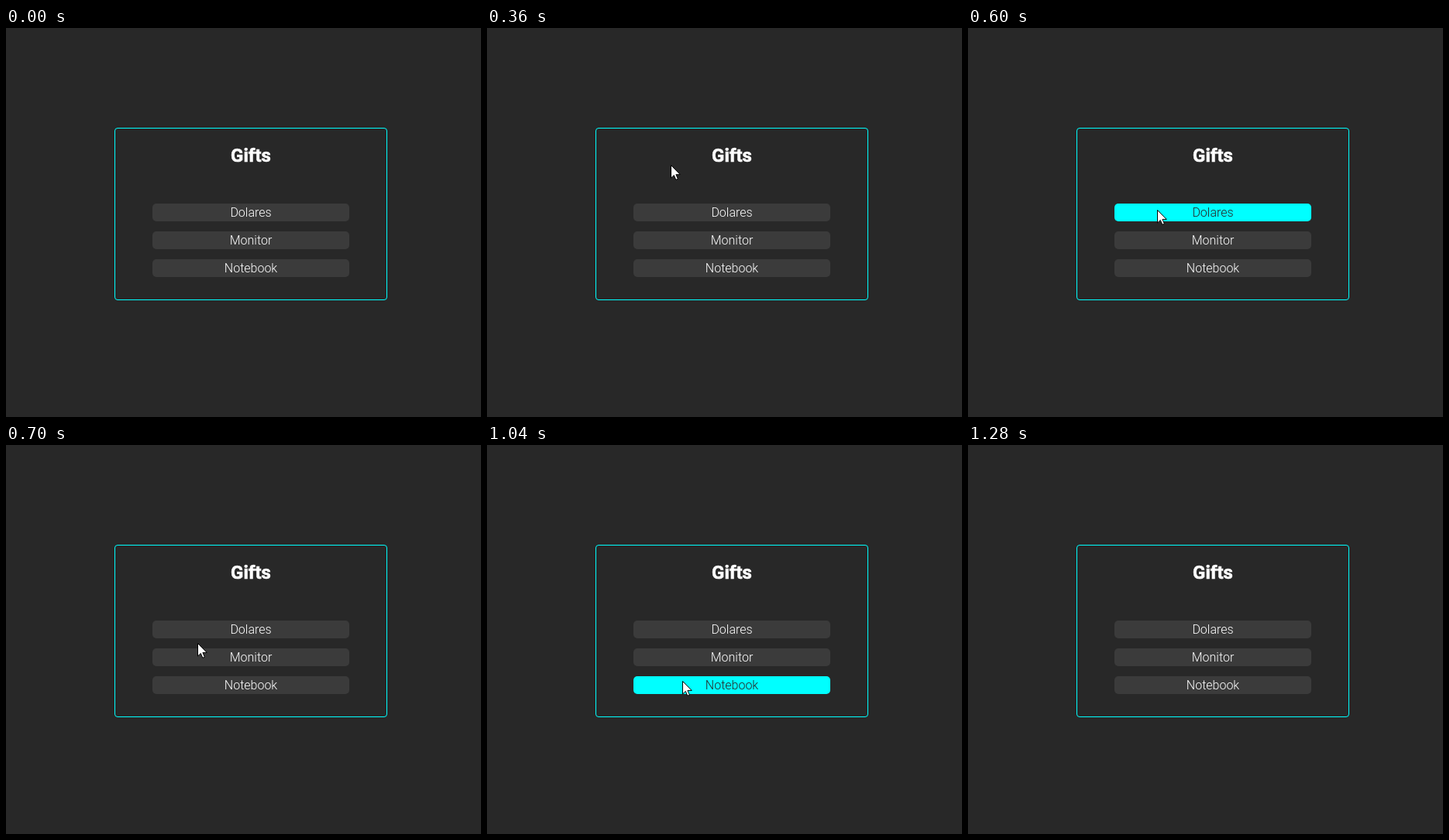
An HTML page for the animation above (1960 ms loop, 613 px wide and 503 px high).

```html
<!DOCTYPE html>
<html lang="en">
<head>
<meta charset="utf-8">
<title>Gifts</title>
<style>
  html, body { margin: 0; width: 100%; height: 100%; overflow: hidden; background: #282828; }
  body { position: relative; font: 300 16px/23px Roboto, sans-serif; color: #fff; text-align: center; }
  .card {
    position: absolute; left: 140px; top: 129px; width: 352px; height: 223px;
    box-sizing: border-box; border: 1px solid #0ff; border-radius: 4px;
  }
  h2 {
    position: absolute; left: 0; right: 0; top: 21px; margin: 0;
    font-size: 24px; line-height: 28px; font-weight: 700; -webkit-text-stroke: .6px #fff;
  }
  ul { position: absolute; left: 48px; top: 97px; width: 254px; margin: 0; padding: 0; list-style: none; }
  li { height: 23px; margin-bottom: 13px; border-radius: 5px; background: #3b3b3b; }
  li.hover { background: #0ff; color: #282828; }
  #cursor { position: absolute; left: 0; top: 0; width: 14px; height: 21px; }
</style>
</head>
<body>
<div class="card">
  <h2>Gifts</h2>
  <ul><li>Dolares</li><li>Monitor</li><li>Notebook</li></ul>
</div>
<svg id="cursor" viewBox="0 0 14 21">
  <path d="M.5 .5V17L4.3 13.4L6.8 19.3L9.4 18.2L6.9 12.4H12.2Z" fill="#fff" stroke="#000"/>
</svg>
<script>
  const LOOP = 1960, STEP = 20;

  // pointer tip: sweeps in, drifts down the list, sweeps out
  const path = [
    { t: 40, x: 602, y: 34 },
    { t: 220, x: 270, y: 126 },
    { t: 380, x: 236, y: 183 },
    { t: 500, x: 239, y: 212 },
    { t: 700, x: 247, y: 256 },
    { t: 840, x: 247, y: 283 },
    { t: 1040, x: 252, y: 305 },
    { t: 1100, x: 256, y: 312 },
    { t: 1280, x: 656, y: 376 }
  ];
  const last = path.length - 1;
  const cursor = document.getElementById('cursor');
  const items = [...document.querySelectorAll('li')];

  const speed = (i, k) => (path[i + 1][k] - path[i][k]) / (path[i + 1].t - path[i].t);

  // harmonic mean of neighbouring speeds, so the curve never overshoots
  function slope(i, k) {
    if (i === 0) return (3 * speed(0, k) - slope(1, k)) / 2;
    if (i === last) return (3 * speed(last - 1, k) - slope(last - 1, k)) / 2;
    const a = speed(i - 1, k), b = speed(i, k);
    return a * b > 0 ? 2 * a * b / (a + b) : 0;
  }

  function at(t, k) {
    const i = path.findIndex(p => p.t > t) - 1;
    const a = path[i], b = path[i + 1], d = b.t - a.t, u = (t - a.t) / d, v = 1 - u;
    return Math.round(v * v * (1 + 2 * u) * a[k] + u * u * (1 + 2 * v) * b[k]
      + d * u * v * (v * slope(i, k) - u * slope(i + 1, k)));
  }

  function draw(ms) {
    const t = Math.floor((ms % LOOP) / STEP) * STEP;
    const shown = t >= path[0].t && t < path[last].t;
    const x = shown ? at(t, 'x') : -99, y = shown ? at(t, 'y') : -99;
    cursor.style.transform = `translate(${x}px, ${y}px)`;
    items.forEach((li, i) => {
      const top = 227 + 36 * i;
      li.classList.toggle('hover', x >= 189 && x < 443 && y >= top && y < top + 23);
    });
  }

  const start = performance.now();
  function tick() {
    draw(performance.now() - start);
    requestAnimationFrame(tick);
  }
  tick();
</script>
</body>
</html>
```
